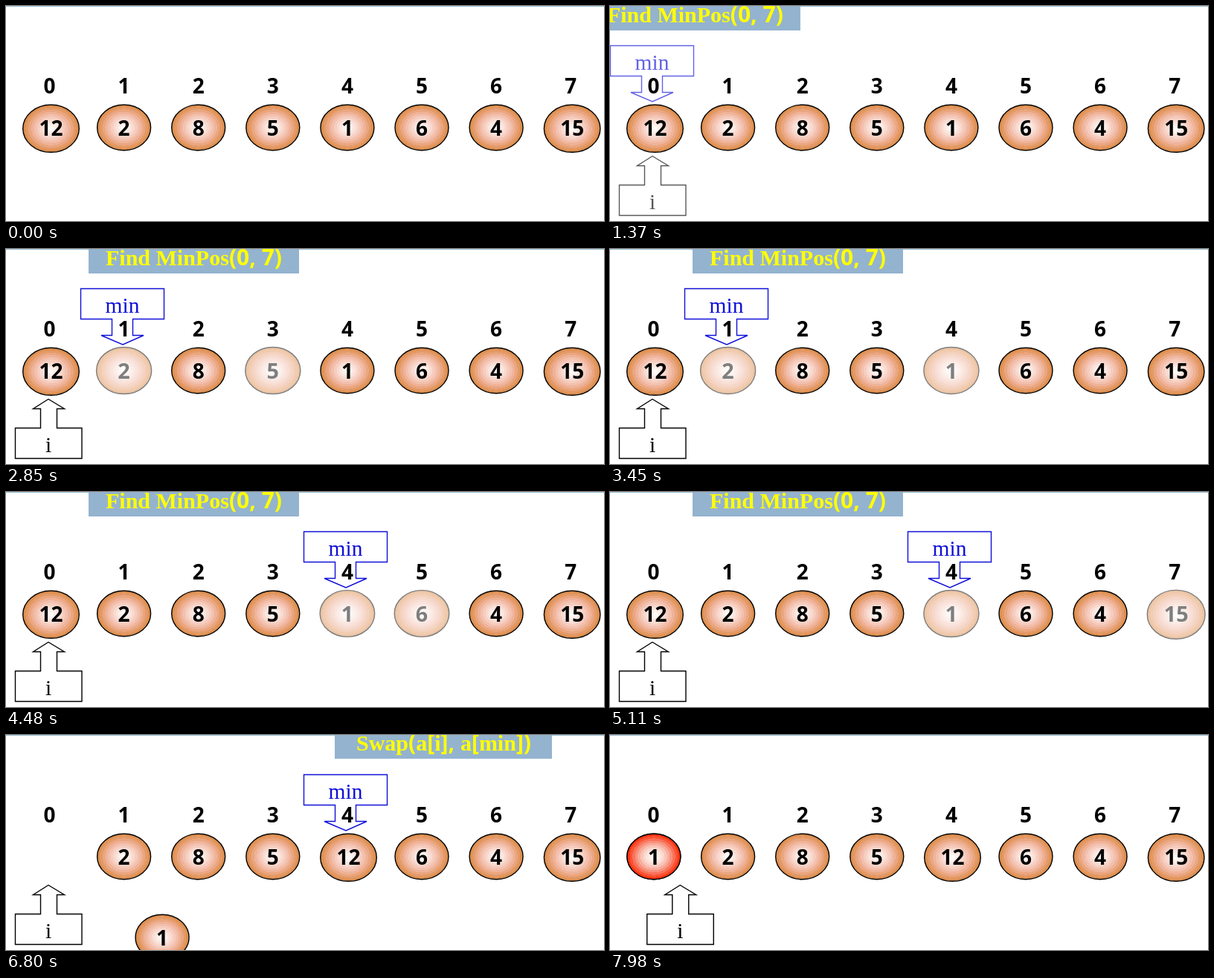
These frames come from a looping animation (804x290 px, 8000 ms). An HTML page:

```html
<!DOCTYPE html>
<html lang="en">
<head>
<meta charset="utf-8">
<title>Selection sort, first pass</title>
<style>
  html, body { margin: 0; width: 100%; height: 100%; overflow: hidden; background: #fff; }
  svg { display: block; width: 804px; height: 290px; }
  .num { font: bold 28px "Open Sans", "Noto Sans", sans-serif; text-anchor: middle; }
  .title { font: bold 30px "Liberation Serif", "Times New Roman", serif; fill: #ff0; }
  .title tspan { font-family: "Open Sans", "Noto Sans", sans-serif; }
  .tag { font: 29.5px "Liberation Serif", "Times New Roman", serif; text-anchor: middle; }
  .arrow { fill: none; stroke-width: 1.4; }
</style>
</head>
<body>
<svg viewBox="0 0 804 290">
  <defs>
    <radialGradient id="tan"></radialGradient>
    <radialGradient id="red"></radialGradient>
  </defs>
  <rect width="804" height="1" fill="#98c2da"/>
  <g id="find">
    <rect x="111" y="-12" width="283" height="45" fill="#94b3cf"/>
    <text class="title" x="134" y="22">Find MinPos<tspan>(0, 7)</tspan></text>
  </g>
  <g id="swap">
    <rect x="442" y="-12" width="292" height="44" fill="#94b3cf"/>
    <text class="title" x="471" y="21">Swap<tspan>(</tspan>a<tspan>[</tspan>i<tspan>], </tspan>a<tspan>[</tspan>min<tspan>])</tspan></text>
  </g>
  <g id="labels"></g>
  <g id="iPtr">
    <path class="arrow" stroke="#000" d="M12.5 241.5H46.500V215.500H36.500L57 202.500L78.500 215.500H68.500V241.500H102V282.500H12.500Z"/>
    <text class="tag" x="57" y="274">i</text>
  </g>
  <g id="balls"></g>
  <g id="minPtr">
    <path class="arrow" stroke="#1010d8" d="M.5 53.500H112.500V94.500H70.500V116.500H85L57 129L28 116.500H42.500V94.500H.5Z"/>
    <text class="tag" fill="#1010d8" x="56.500" y="86">min</text>
  </g>
</svg>
<script>
const LOOP = 8000, PITCH = 100.1, DEPTH = 109, SPAN = 400;
const PULSE = 420;
const values = [12, 2, 8, 5, 1, 6, 4, 15];

// start time and the two compared slots
const compares = [
  [1510, 0, 1], [2310, 1, 2], [2730, 1, 3], [3150, 1, 4],
  [4150, 4, 5], [4570, 4, 6], [4990, 4, 7]
];

const $ = id => document.getElementById(id);
const clamp = x => Math.max(0, Math.min(1, x));
const part = (t, start, length) => clamp((t - start) / length);
const smooth = p => p < .5 ? 2 * p * p : 1 - 2 * (1 - p) * (1 - p);
const shift = (node, x, y = 0) => node.setAttribute("transform", `translate(${x} ${y})`);

function add(parent, tag, attrs, text) {
  const node = document.createElementNS("http://www.w3.org/2000/svg", tag);
  for (const key in attrs) node.setAttribute(key, attrs[key]);
  if (text !== undefined) node.textContent = text;
  return parent.appendChild(node);
}

// hard-edged rings from the pale centre to the rim
function rings(id, colors) {
  colors.forEach((color, k) => {
    for (const edge of [k, k + 1])
      add($(id), "stop", { offset: edge / colors.length, "stop-color": color });
  });
}
rings("tan", ["#fffaf7", "#fdf1ec", "#fbe6df", "#f9dad0", "#f6cdbf", "#f3c0ae", "#efb399", "#eaa680", "#e49a66", "#dd8f50"]);
rings("red", ["#fffaf7", "#fdf1ec", "#fce6df", "#fbd8ce", "#f9c5b8", "#f8ad9d", "#f8917d", "#f9735a", "#fb5334", "#fd3512"]);

const balls = values.map((value, k) => {
  const wide = value > 9;
  const x = 58.5 + k * PITCH + (wide ? 2 : 0), y = wide ? 165.3 : 164;
  const shape = { cx: x, cy: y, rx: wide ? 37.8 : 36, ry: wide ? 32 : 30.7, stroke: "#000", "stroke-width": 1.4 };
  add($("labels"), "text", { class: "num", x: 58.5 + k * PITCH, y: 118 }, k);
  const group = add($("balls"), "g", {});
  const body = add(group, "g", {});
  add(body, "ellipse", { ...shape, fill: "url(#tan)" });
  const glow = add(body, "ellipse", { ...shape, fill: "url(#red)", opacity: 0 });
  add(body, "text", { class: "num", x, y: 175 }, value);
  return { group, body, glow, x, y };
});

// down, across and up again
function detour(p, dir) {
  const d = smooth(p) * (SPAN + 2 * DEPTH);
  return [dir * Math.max(0, Math.min(SPAN, d - DEPTH)),
          Math.min(d, DEPTH, SPAN + 2 * DEPTH - d)];
}

function pulse(ball, p) {
  const fade = .5 * clamp(Math.min(p, 1 - p) / .2);
  const size = 1 + .05 * (1 - Math.abs(2 * p - 1));
  ball.body.setAttribute("opacity", 1 - fade);
  ball.body.setAttribute("transform",
    `translate(${ball.x} ${ball.y}) scale(${size}) translate(${-ball.x} ${-ball.y})`);
}

function render(t) {
  shift($("find"), -396 * (1 - part(t, 1130, 370)) - 396 * part(t, 5410, 190));
  shift($("swap"), 364 * (1 - part(t, 5480, 280)) + 364 * part(t, 7100, 320));

  shift($("iPtr"), 100 * smooth(part(t, 7690, 674)));
  $("iPtr").setAttribute("opacity", part(t, 1130, 370));

  shift($("minPtr"), 100 * smooth(part(t, 1930, 384)) + 300 * smooth(part(t, 3570, 580)));
  $("minPtr").setAttribute("opacity", part(t, 1130, 370) - part(t, 7100, 320));

  const phase = values.map(() => 0);
  for (const [start, a, b] of compares)
    if (t >= start && t < start + PULSE) phase[a] = phase[b] = (t - start) / PULSE;
  balls.forEach((ball, k) => pulse(ball, phase[k]));

  shift(balls[0].group, ...detour(part(t, 5810, 643), 1));
  shift(balls[4].group, ...detour(part(t, 6453, 643), -1));
  balls[4].glow.setAttribute("opacity", part(t, 7420, 330));
}

const begin = performance.now();
function frame() {
  render((performance.now() - begin) % LOOP);
  requestAnimationFrame(frame);
}
render(0);
requestAnimationFrame(frame);
</script>
</body>
</html>
```
